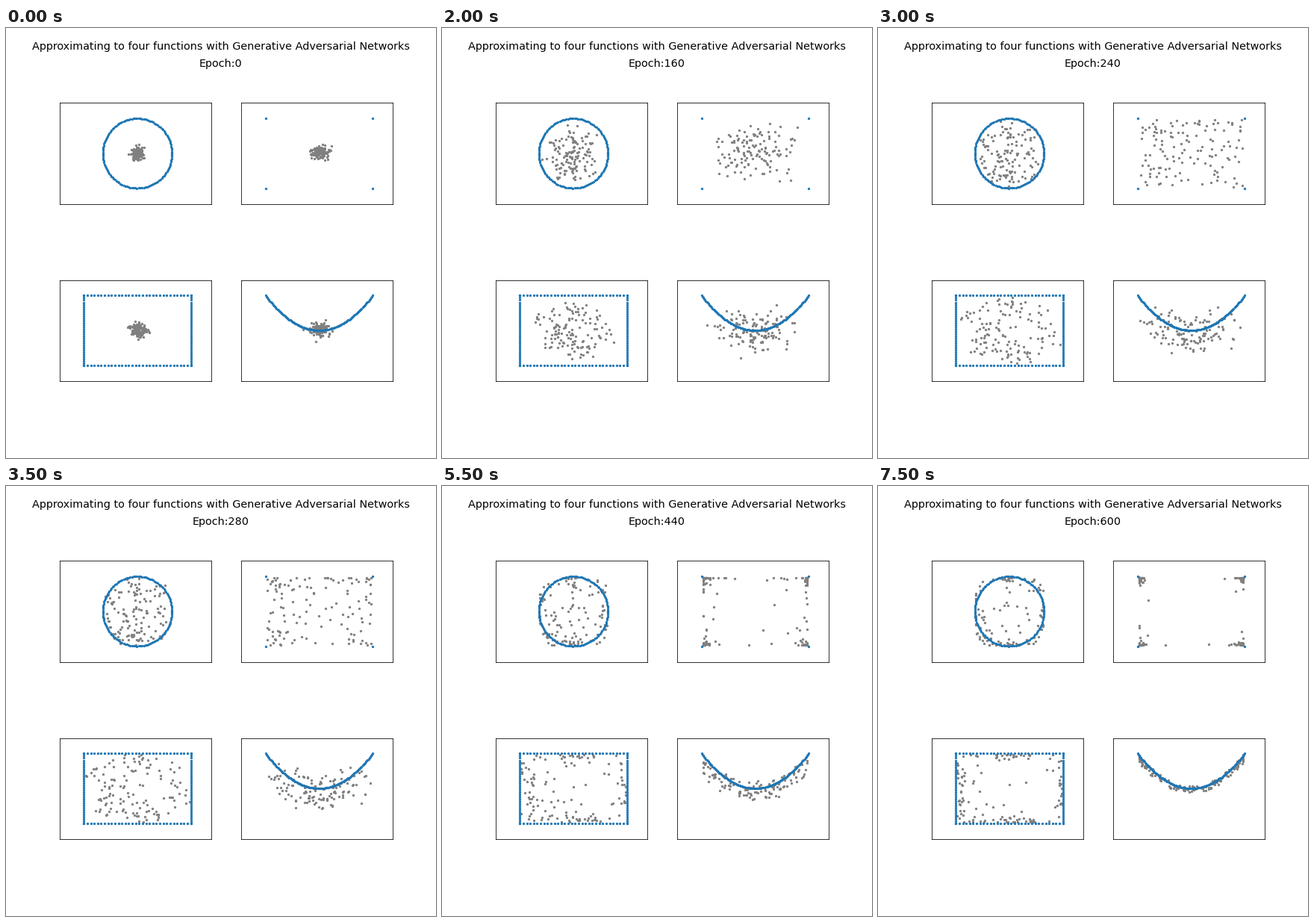
Write a matplotlib script that moves like this. It is 576 px wide and 576 px high and loops after 8000 ms.

```python
import numpy as np
import matplotlib.pyplot as plt
from matplotlib.animation import FuncAnimation

N = 128
FRAMES, STEP = 16, 40
RX = 0.646  # makes the circle round in the stretched axes
BLUE, GRAY = "#1f77b4", "gray"

rng = np.random.default_rng(7)


def squash(g, s, p):
    """Push points out along their own ray until they reach the unit Lp ball."""
    r = np.linalg.norm(g, ord=p, axis=1, keepdims=True)
    return g / r * np.tanh(s * r)


class Cloud:
    """Points with fixed latent noise, spread by a sharpness that grows."""

    scale = np.array([1, 1])

    def __init__(self):
        self.g = rng.normal(0, 1, (N, 2)) * [1, 1.15]
        self.inset = 1 - 0.05 * rng.exponential(1, (N, 2))
        self.phase = rng.uniform(0, 2 * np.pi, (N, 2))

    def at(self, k):
        t = k / (FRAMES - 1)
        spread = 0.09 + 0.07 * k
        wander = 0.05 * np.sin(np.pi * t) * np.sin(0.7 * k + self.phase)
        pos = self.shape(spread, t) + wander + 0.02 * (1 - t)
        return np.clip(pos, -0.97, 0.97) * self.scale


class Circle(Cloud):
    scale = np.array([RX, 1])

    def shape(self, spread, t):
        return squash(self.g, spread + 0.8 * t ** 2, 3.5) * (self.inset + 0.04)


class Corners(Cloud):
    def shape(self, spread, t):
        return np.tanh((spread + 18 * t ** 4) * self.g) * self.inset


class Box(Cloud):
    def shape(self, spread, t):
        return squash(self.g, spread + 0.8 * t ** 2, np.inf) * self.inset


class Parabola(Cloud):
    def shape(self, spread, t):
        x, loose = np.tanh(spread * self.g).T
        w = 0.92 * t * t * (3 - 2 * t)
        near = x ** 2 + 0.05 * np.sin(self.phase[:, 0])
        y = (1 - w) * (loose - 0.4 * w) + w * near
        return np.column_stack([x, y])


def targets():
    a = np.linspace(0, 2 * np.pi, N)
    s = np.linspace(-1, 1, N // 4)
    one = np.ones_like(s)
    x = np.linspace(-1, 1, N)
    return [
        (RX * np.cos(a), np.sin(a)),
        ([-1, -1, 1, 1], [-1, 1, -1, 1]),
        (np.r_[s, s, -one, one], np.r_[-one, one, s, s]),
        (x, x ** 2),
    ]


clouds = [Circle(), Corners(), Box(), Parabola()]

fig, axes = plt.subplots(2, 2, figsize=(8, 8), dpi=72)
fig.subplots_adjust(left=0.125, right=0.9, top=475.6 / 576,
                    bottom=102.7 / 576, wspace=0.2, hspace=0.75)

label = dict(ha="center", va="baseline", fontsize=14.4, family="DejaVu Sans")
fig.text(0.5, 1 - 29 / 576, "Approximating to four functions with "
         "Generative Adversarial Networks", **label)
epoch = fig.text(0.5, 1 - 52 / 576, "", **label)

dots = []
for ax, (x, y) in zip(axes.flat, targets()):
    ax.set(xlim=(-1.45, 1.38), ylim=(-1.46, 1.445), xticks=[], yticks=[])
    dots += ax.plot([], [], ".", color=GRAY, ms=4.6)
    ax.plot(x, y, ".", color=BLUE, ms=4.6)


def draw(k):
    epoch.set_text(f"Epoch:{k * STEP}")
    for dot, cloud in zip(dots, clouds):
        dot.set_data(*cloud.at(k).T)
    return [epoch, *dots]


anim = FuncAnimation(fig, draw, frames=FRAMES, interval=500,
                     repeat=True, repeat_delay=0)
plt.show()
```
